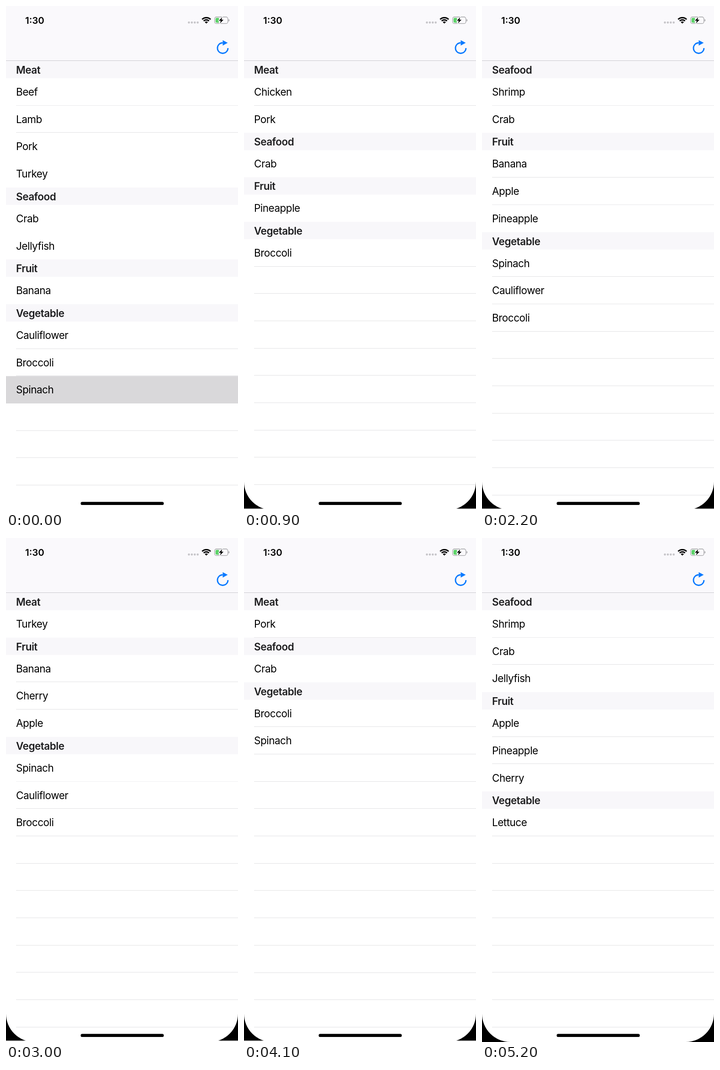
Animation, 508 px wide and 1102 px high, one loop 5300 ms. Source, as an HTML page with a canvas:

```html
<!DOCTYPE html>
<html lang="en">
<head>
<meta charset="utf-8">
<title>Food list</title>
<style>
  html, body { margin: 0; width: 100%; height: 100%; overflow: hidden; background: #fff; }
  canvas { display: block; width: 508px; height: 1102px; }
</style>
</head>
<body>
<canvas id="stage" width="508" height="1102"></canvas>
<script>
const ctx = document.getElementById('stage').getContext('2d');
const W = 508, H = 1102, LOOP = 5300, STEP = 100, DURATION = 400;
const TOP = 120, HEAD = 38, ROW = 59.7, LEFT = 22;
const FONT = 'Inter, "Noto Sans", sans-serif';
const BAR = '#faf9fc', HEADER = '#f8f7fa', LINE = '#e1e1e3', BLUE = '#0a7aff';

const states = [
  { Meat: 'Beef Lamb Pork Turkey', Seafood: 'Crab Jellyfish', Fruit: 'Banana', Vegetable: 'Cauliflower Broccoli Spinach' },
  { Meat: 'Chicken Pork', Seafood: 'Crab', Fruit: 'Pineapple', Vegetable: 'Broccoli' },
  { Meat: 'Lamb Turkey Pork', Vegetable: 'Broccoli' },
  { Seafood: 'Shrimp Crab', Fruit: 'Banana Apple Pineapple', Vegetable: 'Spinach Cauliflower Broccoli' },
  { Meat: 'Turkey', Fruit: 'Banana Cherry Apple', Vegetable: 'Spinach Cauliflower Broccoli' },
  { Meat: 'Pork', Seafood: 'Crab', Vegetable: 'Broccoli Spinach' },
  { Meat: 'Pork Lamb', Seafood: 'Crab', Fruit: 'Apple', Vegetable: 'Broccoli Lettuce' },
  { Seafood: 'Shrimp Crab Jellyfish', Fruit: 'Apple Pineapple Cherry', Vegetable: 'Lettuce' }
];
const starts = [76, 876, 1692, 2490, 3290, 4090, 4790];

function layout(state) {
  const items = new Map();
  const names = Object.keys(state);
  let y = TOP;
  names.forEach((name, s) => {
    items.set(name, { text: name, header: true, section: name, y });
    y += HEAD;
    const rows = state[name].split(' ');
    rows.forEach((text, i) => {
      const line = i < rows.length - 1 || s === names.length - 1;
      items.set(text, { text, section: name, y, line });
      y += ROW;
    });
  });
  return { items, end: y };
}
const layouts = states.map(layout);

// Where items missing from the other layout collapse to: the end of the last kept neighbour.
function collapse(items, other) {
  const spots = new Map();
  let sectionEnd = TOP, rowEnd = TOP;
  for (const [key, item] of items) {
    const keptSection = other.has(item.section);
    const size = item.header ? HEAD : ROW;
    if (!keptSection) {
      spots.set(key, sectionEnd + (item.header ? 0 : HEAD));
      continue;
    }
    if (item.header) rowEnd = item.y + HEAD;
    else if (other.has(key)) rowEnd = item.y + ROW;
    else spots.set(key, rowEnd);
    sectionEnd = item.y + size;
  }
  return spots;
}

const mix = (a, b, p) => a + (b - a) * p;

function easeInOut(x) {
  if (x <= 0) return 0;
  if (x >= 1) return 1;
  let lo = 0, hi = 1;
  for (let i = 0; i < 24; i++) {
    const s = (lo + hi) / 2, r = 1 - s;
    if (1.26 * s * r * r + 1.74 * s * s * r + s ** 3 < x) lo = s; else hi = s;
  }
  return lo * lo * (3 - 2 * lo);
}

function rect(x, y, w, h, color) {
  ctx.fillStyle = color;
  ctx.fillRect(x, y, w, h);
}

function pill(x, y, w, h, r, color) {
  ctx.fillStyle = color;
  ctx.beginPath();
  ctx.roundRect(x, y, w, h, r);
  ctx.fill();
}

function polygon(color, ...points) {
  ctx.fillStyle = color;
  ctx.beginPath();
  points.forEach(([x, y]) => ctx.lineTo(x, y));
  ctx.closePath();
  ctx.fill();
}

function label(text, x, y, weight, size, color, spacing) {
  ctx.font = `${weight} ${size}px ${FONT}`;
  ctx.letterSpacing = spacing + 'px';
  ctx.fillStyle = color;
  ctx.fillText(text, x, y);
}

const separator = y => rect(LEFT, Math.round(y - 1), W - LEFT, 1, LINE);

function drawItem({ text, header, line, y, alpha, selected }) {
  ctx.globalAlpha = alpha;
  if (header) {
    rect(0, y, W, HEAD, HEADER);
    label(text, LEFT, y + 28, 600, 22.5, '#1c1c1e', -0.5);
  } else {
    rect(0, y, W, ROW, selected ? '#d9d8da' : '#fff');
    if (line && !selected) separator(y + ROW);
    label(text, LEFT, y + 38, 400, 22.5, '#000', -0.5);
  }
  ctx.globalAlpha = 1;
}

function drawTable(from, to, p, firstState) {
  for (let y = mix(from.end, to.end, p); y < H; y += ROW) separator(y);

  const inserted = [], kept = [], removed = [];
  const origins = collapse(to.items, from.items);
  const targets = collapse(from.items, to.items);
  for (const [key, item] of to.items) {
    const old = from.items.get(key);
    const y = mix(old ? old.y : origins.get(key), item.y, p);
    (old ? kept : inserted).push({ ...item, y, alpha: old ? 1 : p });
  }
  for (const [key, item] of from.items) {
    if (to.items.has(key)) continue;
    const selected = firstState && key === 'Spinach';
    removed.push({ ...item, y: mix(item.y, targets.get(key), p), alpha: 1 - p, selected });
  }
  const all = [...inserted, ...kept, ...removed];
  all.filter(item => !item.header).forEach(drawItem);
  all.filter(item => item.header).forEach(drawItem);
}

function drawWifi(x, y) {
  const a = -Math.PI * 0.75, b = -Math.PI * 0.25;
  ctx.strokeStyle = ctx.fillStyle = '#000';
  ctx.lineWidth = 3;
  for (const r of [13.2, 8.3]) {
    ctx.beginPath();
    ctx.arc(x, y, r, a, b);
    ctx.stroke();
  }
  ctx.beginPath();
  ctx.moveTo(x, y);
  ctx.arc(x, y, 4.8, a, b);
  ctx.fill();
}

function drawBattery() {
  ctx.strokeStyle = '#a2a2a5';
  ctx.lineWidth = 1.3;
  ctx.beginPath();
  ctx.roundRect(456.8, 24, 29, 14.4, 4);
  ctx.stroke();
  pill(487.3, 28.8, 1.8, 5, [0, 2, 2, 0], '#a2a2a5');
  pill(458.8, 26, 7.4, 10.4, [2.4, 0, 0, 2.4], '#5ad267');
  const bolt = [[473.5, 24.5], [466, 32.2], [470.3, 32.2], [468.6, 38], [476.2, 30], [471.9, 30]];
  ctx.lineWidth = 2;
  ctx.strokeStyle = BAR;
  polygon('#000', ...bolt);
  ctx.stroke();
  polygon('#000', ...bolt);
}

function drawBar() {
  rect(0, 0, W, TOP, BAR);
  rect(0, TOP - 1, W, 1, '#c9c8cc');
  label('1:30', 42, 38.5, 600, 20.5, '#000', 0);
  for (let i = 0; i < 4; i++) pill(398.2 + i * 6.4, 33.8, 4.6, 4.6, 2.3, '#c6c5c9');
  drawWifi(438.7, 38.6);
  drawBattery();

  ctx.strokeStyle = BLUE;
  ctx.lineWidth = 2.8;
  ctx.beginPath();
  ctx.arc(474.5, 92, 11.5, 0, Math.PI * 1.5);
  ctx.stroke();
  polygon(BLUE, [474.5, 74.8], [485.5, 80.6], [474.5, 86.6]);
}

function drawCorners(bottom) {
  ctx.fillStyle = '#000';
  ctx.beginPath();
  ctx.rect(0, 1030, W, bottom - 1030);
  ctx.roundRect(0, 900, W, H - 900, [0, 0, 62, 62]);
  ctx.save();
  ctx.clip('evenodd');
  ctx.fillRect(0, 1030, W, bottom - 1030);
  ctx.restore();
}

function draw(t) {
  rect(0, 0, W, H, '#fff');
  let i = starts.length - 1;
  while (i > 0 && t < starts[i]) i--;
  drawTable(layouts[i], layouts[i + 1], easeInOut((t - starts[i]) / DURATION), i === 0);
  drawBar();
  if (t >= 100) drawCorners(t < 4200 ? 1099 : H);
  pill(163.5, 1084.3, 182, 6.8, 3.4, '#000');
}

function tick() {
  const t = performance.now() % LOOP;
  draw(Math.floor(t / STEP) * STEP);
  requestAnimationFrame(tick);
}
tick();
</script>
</body>
</html>
```
